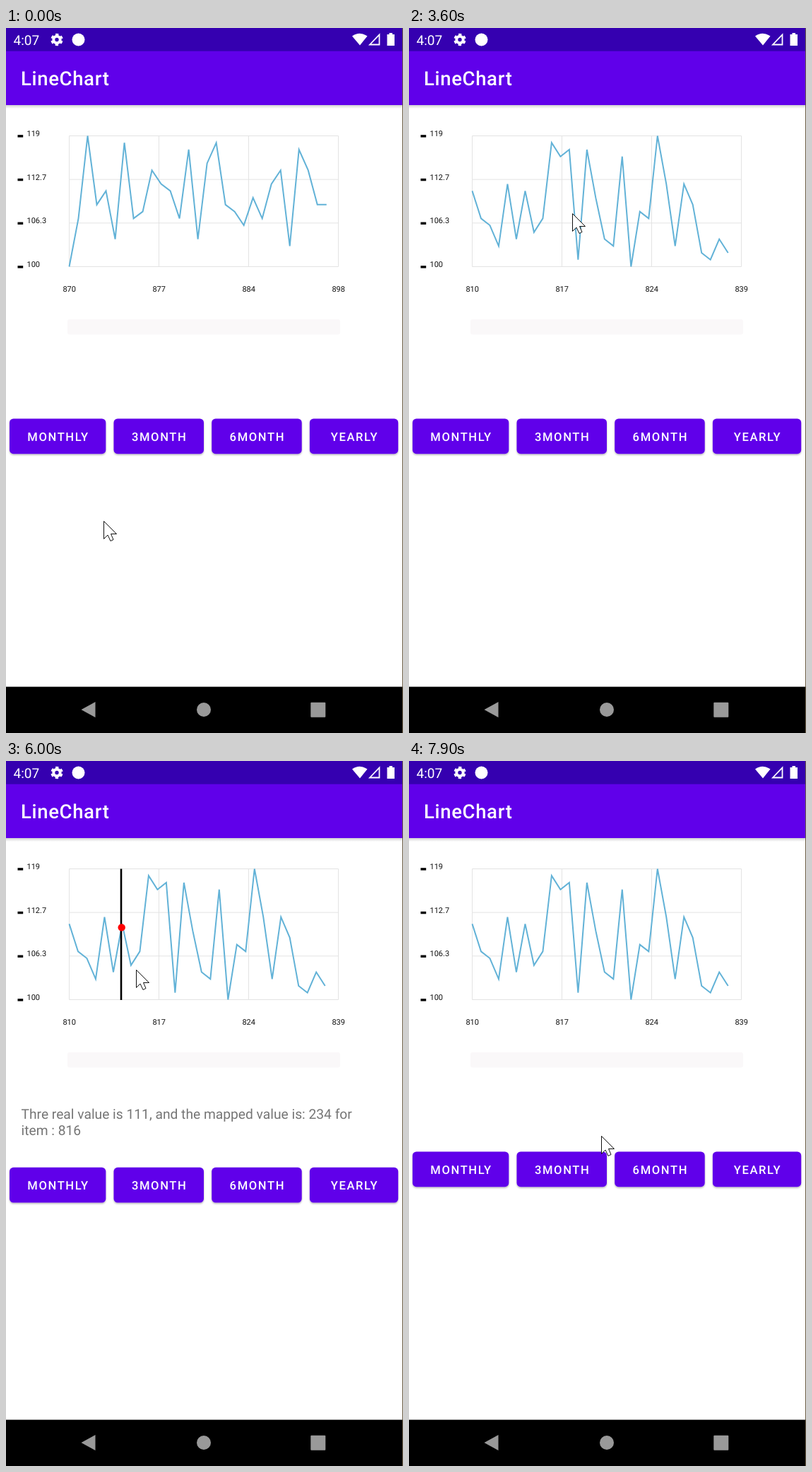
An HTML page for the animation above (8 s loop, 562x997 px).

```html
<!DOCTYPE html>
<html lang="en">
<head>
<meta charset="utf-8">
<title>Line chart</title>
<style>
  html, body { margin: 0; width: 100%; height: 100%; overflow: hidden; background: #fff; }
  svg { display: block; width: 100vw; height: 100vh; font-family: Roboto, sans-serif; text-rendering: geometricPrecision; }
  .label { font-size: 11px; fill: #111; }
  .mid { text-anchor: middle; }
  .button { font-size: 16.6px; font-weight: 500; letter-spacing: 1.6px; fill: #fff; text-anchor: middle; }
  .result { font-size: 19.23px; fill: #757575; }
</style>
</head>
<body>
<svg viewBox="0 0 562 997">
  <defs>
    <linearGradient id="fade" x2="0" y2="1">
      <stop stop-color="#000" stop-opacity=".18"/>
      <stop offset="1" stop-color="#000" stop-opacity="0"/>
    </linearGradient>
    <filter id="shadow" x="-10%" y="-20%" width="120%" height="150%">
      <feDropShadow dx="0" dy="1.5" stdDeviation="1.3" flood-opacity=".3"/>
    </filter>
  </defs>

  <rect width="562" height="997" fill="#fff"/>
  <rect y="109" width="562" height="5" fill="url(#fade)"/>
  <rect width="562" height="109" fill="#6000ea"/>
  <rect width="562" height="32.7" fill="#3500b0"/>
  <text x="10.5" y="23.5" font-size="19.1" fill="#fff">4:07</text>
  <text x="21" y="81" font-size="27.5" font-weight="500" letter-spacing=".65" fill="#fff">LineChart</text>

  <g fill="#fff">
    <circle cx="72" cy="16.5" r="4.7" fill="none" stroke="#fff" stroke-width="4"/>
    <circle cx="72" cy="16.5" r="7.4" fill="none" stroke="#fff" stroke-width="2.6"
            stroke-dasharray="4.2 3.55" stroke-dashoffset="-1.8"/>
    <circle cx="102.5" cy="16.5" r="9"/>
    <path d="M490 11.5Q500.5 4 511.5 11.5L501 24.5Z"/>
    <path d="M528.5 9.5V23.5H515Z" fill="none" stroke="#fff" stroke-width="1.8"/>
    <path d="M542.5 7h4.5v2h3v16h-10.5v-16h3z"/>
  </g>

  <g id="chart"></g>
  <polyline id="line" fill="none" stroke="#62b2d7" stroke-width="2"/>
  <rect x="87" y="412" width="386" height="21.5" rx="3" fill="#faf8f9"/>

  <g id="marker">
    <path d="M0 152.5V338" stroke="#000" stroke-width="2.6"/>
    <circle id="dot" cx=".7" r="5.2" fill="#f00"/>
  </g>
  <g id="result" class="result">
    <text id="row1" x="21.5" y="506"/>
    <text id="row2" x="21.5" y="528.5"/>
  </g>
  <g id="buttons"></g>

  <rect y="931.6" width="562" height="66" fill="#000"/>
  <g fill="#999">
    <path d="M106.5 964L126.5 953V975Z"/>
    <circle cx="280" cy="964" r="10"/>
    <rect x="431.3" y="953.7" width="21" height="21" rx="1"/>
  </g>
  <path d="M561.5 0V997" stroke="#6a5c45"/>
  <path id="cursor" d="M.5 .5v25l5.5-5.500l4 8.500l4-2l-3.500-8h8z" fill="#fff" stroke="#111"/>
</svg>

<script>
const LOOP = 8000, STEP = 100;
const CHANGE_AT = 2700, PRESS = 5700, RELEASE = 7300;
const DEVICE_SCALE = 562 / 1080;
const LEFT = 89.5, RIGHT = 470.5, TOP = 152.5, BOTTOM = 337.5;
const MIN = 100, MAX = 119;

// Chart readings, as amounts above MIN.
const SERIES = [
  { first: 870, values: [0, 7, 19, 9, 11, 4, 18, 7, 8, 14, 12, 11, 7, 17, 4, 15, 18, 9, 8, 6, 10, 7, 12, 14, 3, 17, 14, 9, 9] },
  { first: 810, values: [11, 7, 6, 3, 12, 4, 11, 5, 7, 18, 16, 17, 1, 17, 10, 4, 3, 16, 0, 8, 7, 19, 12, 3, 12, 9, 2, 1, 4, 2] }
];

const CURSOR_STOPS = [
  { t: 0, x: 138, y: 697 },
  { t: 700, x: 80, y: 575 },
  { t: 3100, x: 80, y: 575 },
  { t: 3600, x: 231, y: 262 },
  { t: 3800, x: 298, y: 297 },
  { t: 4500, x: 260, y: 426 },
  { t: 5600, x: 121, y: 298 },
  { t: PRESS, x: 121, y: 298 },
  { t: 6500, x: 289, y: 290 },
  { t: 7000, x: 357, y: 288 },
  { t: 7200, x: 358, y: 288 },
  { t: 7900, x: 272, y: 530 }
];

const $ = id => document.getElementById(id);
const lerp = (a, b, k) => a + (b - a) * k;
const valueY = v => lerp(BOTTOM, TOP, v / (MAX - MIN));

function add(parent, tag, attrs, text = '') {
  const node = document.createElementNS('http://www.w3.org/2000/svg', tag);
  for (const key in attrs) node.setAttribute(key, attrs[key]);
  node.textContent = text;
  parent.append(node);
  return node;
}

// Points sit a whole number of device pixels apart.
for (const s of SERIES) {
  const count = s.values.length;
  s.step = Math.floor(731 / count) * DEVICE_SCALE;
  s.points = s.values.map((v, i) => [LEFT + i * s.step, valueY(v)]).join(' ');
  s.ticks = [0, 7, 14, count - 1].map(i => s.first + i);
}

const tickLabels = [];
for (let i = 0; i < 4; i++) {
  const x = lerp(LEFT, RIGHT, i / 3), y = lerp(TOP, BOTTOM, i / 3);
  const value = lerp(MAX, MIN, i / 3);
  add($('chart'), 'path', { d: `M${LEFT} ${y}H${RIGHT}M${x} ${TOP}V${BOTTOM}`, stroke: '#e3e3e3' });
  add($('chart'), 'rect', { x: 16.5, y: y - 1.3, width: 7.7, height: 3.4 });
  add($('chart'), 'text', { class: 'label', x: 29.5, y: y + 0.5 }, +value.toFixed(1));
  tickLabels.push(add($('chart'), 'text', { class: 'label mid', x: x + 0.2, y: 373 }));
}

let buttonX = 5;
for (const [text, width] of [['MONTHLY', 136.3], ['3MONTH', 127.5], ['6MONTH', 127.5], ['YEARLY', 125.3]]) {
  add($('buttons'), 'rect', { x: buttonX, y: 552.5, width, height: 49.7, rx: 5.5, fill: '#6000ea', filter: 'url(#shadow)' });
  add($('buttons'), 'text', { class: 'button', x: buttonX + width / 2 + 0.9, y: 583.7 }, text);
  buttonX += width + 11.2;
}

function cursorAt(t) {
  const next = CURSOR_STOPS.findIndex(stop => stop.t > t);
  if (next < 0) return CURSOR_STOPS.at(-1);
  const a = CURSOR_STOPS[next - 1], b = CURSOR_STOPS[next];
  const k = (t - a.t) / (b.t - a.t);
  return { x: lerp(a.x, b.x, k), y: lerp(a.y, b.y, k) };
}

function drawMarker(series, t) {
  const { x } = cursorAt(Math.max(PRESS, t - STEP)); // the marker trails the pointer by one step
  const index = Math.round((x - LEFT) / series.step);
  const offset = series.values[index], value = MIN + offset;
  const mapped = Math.floor(84 + (MAX - value) * 18.75);
  const item = series.first + index;
  const start = `Thre real value is ${value}, and the mapped value is: ${mapped} for`;
  const fits = mapped < 100; // a shorter number leaves room for "item :"

  $('marker').setAttribute('transform', `translate(${x} 0)`);
  $('dot').setAttribute('cy', valueY(offset) + 5);
  $('row1').textContent = fits ? start + ' item :' : start;
  $('row2').textContent = fits ? item : 'item : ' + item;
}

function draw(t) {
  const series = SERIES[t < CHANGE_AT ? 0 : 1];
  $('line').setAttribute('points', series.points);
  tickLabels.forEach((label, i) => { label.textContent = series.ticks[i]; });

  const touching = t >= PRESS && t < RELEASE;
  for (const id of ['marker', 'result']) $(id).style.display = touching ? '' : 'none';
  $('buttons').setAttribute('transform', `translate(0 ${touching ? 22.3 : 0})`);
  if (touching) drawMarker(series, t);

  const { x, y } = cursorAt(t);
  $('cursor').setAttribute('transform', `translate(${Math.round(x)} ${Math.round(y)})`);
}

const startTime = performance.now();
function frame() {
  const t = (performance.now() - startTime) % LOOP;
  draw(Math.floor(t / STEP) * STEP);
  requestAnimationFrame(frame);
}
frame();
</script>
</body>
</html>
```
